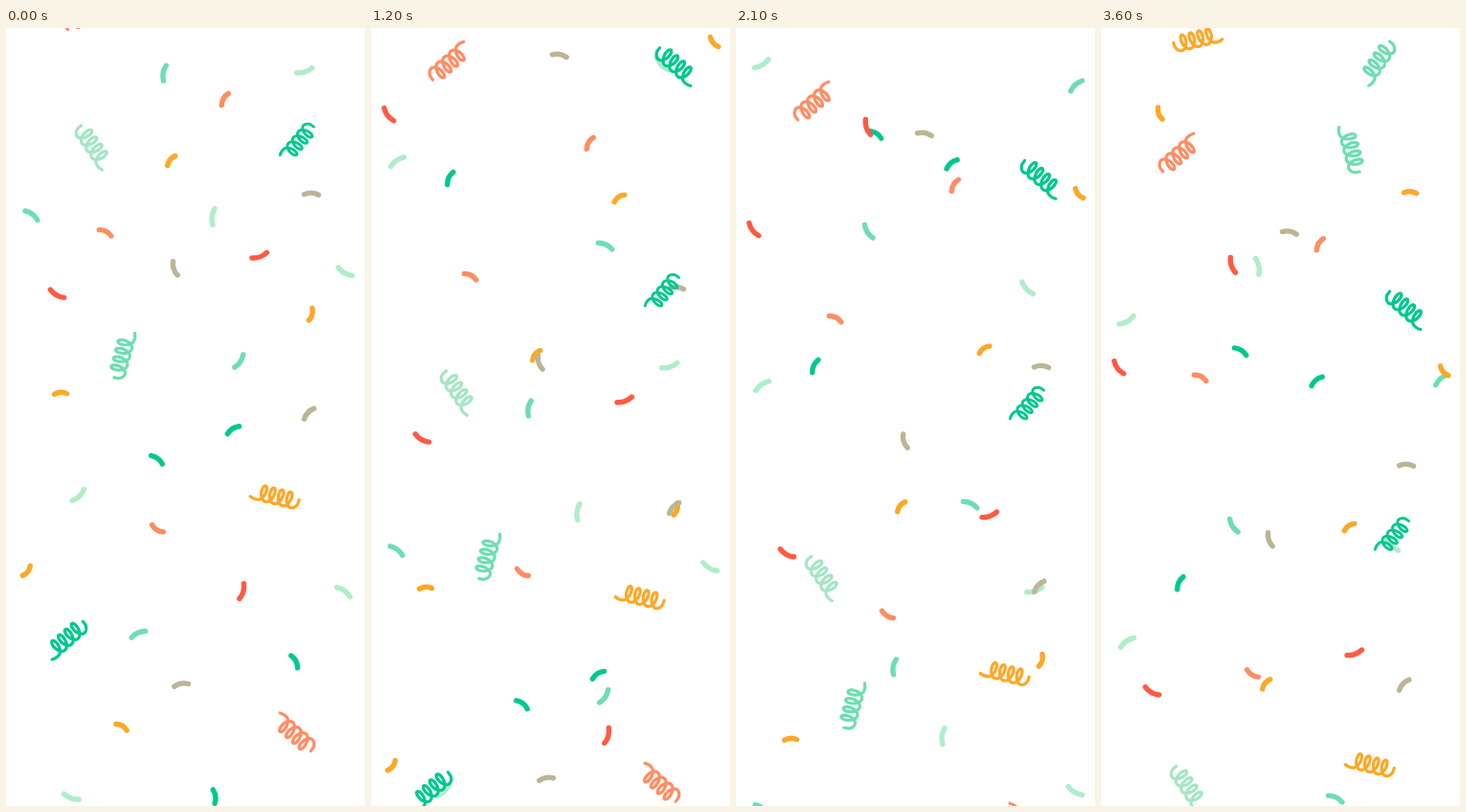
Animation of 375 by 812 pixels, one loop 3.7 s. Source, as an HTML page:

```html
<!DOCTYPE html>
<html lang="en">
<head>
<meta charset="utf-8">
<title>Confetti</title>
<style>
  html, body { margin: 0; width: 100%; height: 100%; overflow: hidden; background: #fff; }
  svg { display: block; width: 375px; height: 812px; }
  path { fill: none; stroke: inherit; stroke-linecap: round; stroke-linejoin: round; }
</style>
</head>
<body>
<svg id="stage" viewBox="0 0 375 812"></svg>
<script>
const NS = 'http://www.w3.org/2000/svg';
const LOOP = 3700, STEP = 100;
const SPEED = 0.0437, BRAKE_AT = 1650, BRAKE = 6.75e-6;
const COLOR = {
  orange: '#ff8d63', olive: '#bcb595', red: '#ff5a43', yellow: '#ffa726',
  green: '#00c88f', light: '#b0edca', mint: '#a5e5c6', mid: '#6fddb3'
};
const DASH = { width: 5.4, drift: 0.0135, lag: 6.6 };
const SPRING = { width: 3.2, drift: 0.0085, lag: 0 };

const stage = document.getElementById('stage');
const layers = [];

function add(tag, attrs, parent) {
  const node = document.createElementNS(NS, tag);
  for (const name in attrs) node.setAttribute(name, attrs[name]);
  return parent.appendChild(node);
}

function addLayer(kind, color, depth, extraLag = 0) {
  const group = add('g', { stroke: COLOR[color], 'stroke-width': kind.width }, stage);
  layers.push({ group, depth, drift: kind.drift, lag: kind.lag + extraLag });
  return group;
}

// Each dash is [x, y, angle]; its bulge points up at angle 0.
function dashes(color, depth, length, pieces, extraLag) {
  const group = addLayer(DASH, color, depth, extraLag);
  const h = length / 2;
  for (const [x, y, angle] of pieces) {
    add('path', {
      d: `M${-h} .9Q0 -2.7 ${h} .9`,
      transform: `translate(${x} ${y}) rotate(${angle})`
    }, group);
  }
}

// A tail leading into four slanted loops with an open end
function coilPath() {
  const end = 8.38 * Math.PI;
  let d = 'M-25.5 3.5Q-21 6.5 -16 5.5';
  for (let a = 0.3; a <= end; a += 0.25) {
    const along = -17 + 1.44 * a;
    const rise = 8 * Math.cos(a);
    const x = along + 4.5 * Math.sin(a) - 0.12 * rise;
    const y = 0.1 * along - 0.5 + rise;
    d += `L${x.toFixed(1)} ${y.toFixed(1)}`;
  }
  return d + 'L25.5 0';
}
const COIL = coilPath();

// Each spring is [x, y, angle, mirror, size]; mirror -1 flips it across its axis.
function springs(color, depth, pieces, extraLag) {
  const group = addLayer(SPRING, color, depth, extraLag);
  for (const [x, y, angle, mirror, size = 1] of pieces) {
    add('path', {
      d: COIL,
      transform: `translate(${x} ${y}) rotate(${angle}) scale(${size} ${mirror * size})`
    }, group);
  }
}

dashes('mid', 6.95, 16, [
  [165, 47, -80], [27, 195, 37], [244, 348, 124], [138, 632, -25],
  [245, -123, 25], [138, -407, 238], [355, -560, -42]], 8);
dashes('light', 6, 17, [
  [312, 45, 162], [216, 197, -83], [354, 255, 210], [76, 488, 136], [353, 588, 35],
  [68, 803, 200], [27, -169, -35], [304, -270, 227], [27, -504, 150], [164, -561, 78]]);
dashes('green', 5, 14.5, [
  [237, 419, -33], [158, 450, 37], [302, 661, 62], [218, 802, 83],
  [82, -99, -65], [146, -341, 32], [225, -310, -40]]);
dashes('orange', 1, 14, [[228, 74, -60], [104, 213, 27], [158, 523, 212]]);
dashes('red', 3, 16.5, [
  [53, 278, 210], [265, 238, 160], [247, 588, 106], [18, -60, 233], [137, -167, 252]]);
dashes('yellow', 4, 13, [
  [172, 138, -52], [319, 299, 106], [57, 381, -3], [22, 567, 128], [121, 729, 30],
  [259, -26, -35], [358, -188, 230], [323, -375, 3], [61, -457, 250]]);
dashes('olive', 2, 15, [
  [319, 173, 2], [176, 251, 252], [316, 402, -47], [183, 685, -10], [197, -70, 10]]);

springs('mint', 5, [[91, 124, -119, -1]], 6);
springs('mid', 4, [[122, 341, 111, -1], [261, -417, 69, 1], [289, -507, -61, 1]]);
springs('green', 3, [[305, 119, -44, -1, 0.9], [63, 638, -47, 1], [319, -118, 227, -1]]);
springs('orange', 1, [[301, 736, 47, -1], [82, -17, 133, 1]]);
springs('yellow', 2, [[281, 489, 8, 1], [101, -268, 172, -1].map((v, i) => i === 2 ? v - 180 : v)]
  .map(([x, y, angle, mirror], i) => i ? [x, y, angle + 180, mirror] : [x, y, angle, mirror]));

// Steady fall that slows down late; nearer layers fall faster.
function fallen({ depth, drift, lag }, t) {
  const late = Math.max(0, t - BRAKE_AT);
  const unit = SPEED * t - BRAKE * late * late * 2 / 2;
  return depth * unit + drift * late - lag * (1 - Math.exp(-t / 150));
}

function draw(time) {
  const t = Math.floor((time % LOOP) / STEP) * STEP;
  for (const layer of layers) {
    layer.group.setAttribute('transform', `translate(0 ${fallen(layer, t).toFixed(2)})`);
  }
}

const start = performance.now();
function tick() {
  draw(performance.now() - start);
  requestAnimationFrame(tick);
}
tick();
</script>
</body>
</html>
```
